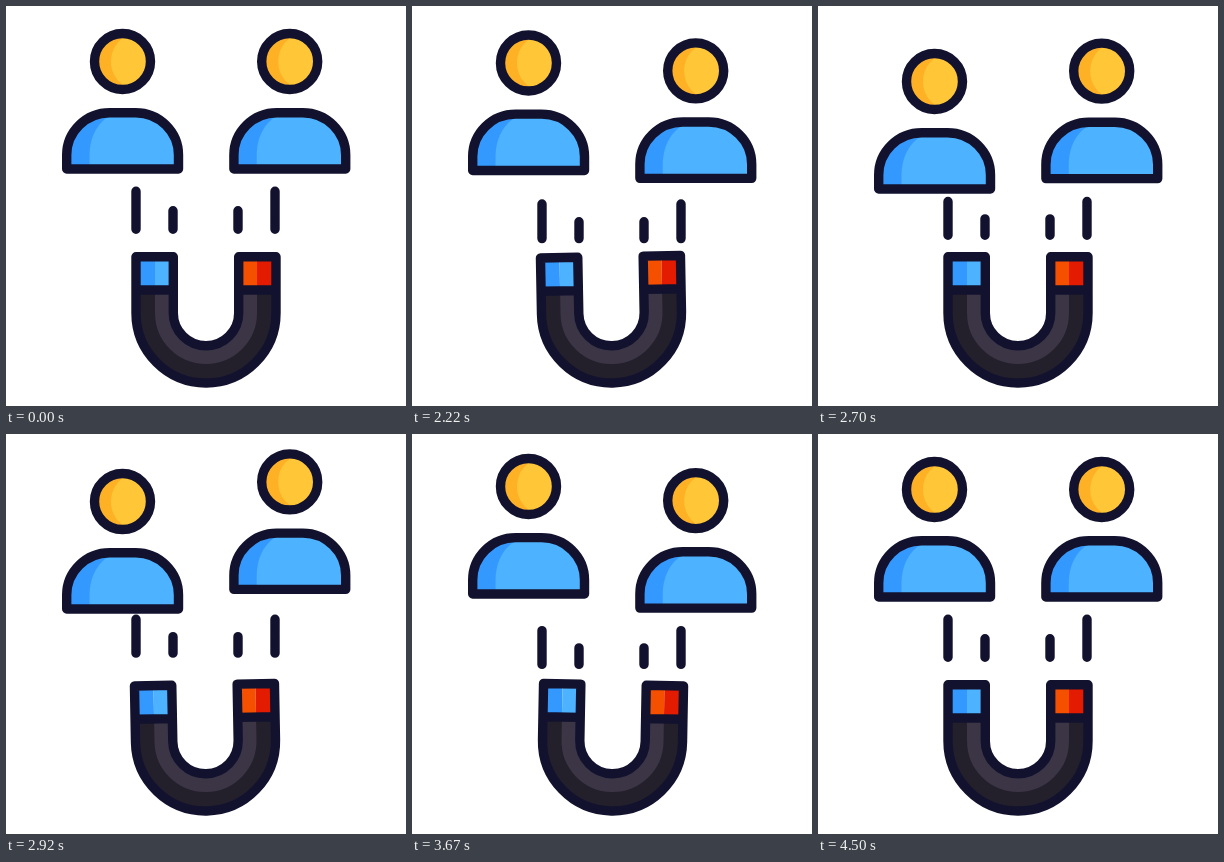
Animation, 400 px wide and 400 px high, one loop 4.52 s. Source, as an HTML page:

```html
<!DOCTYPE html>
<html lang="en">
<head>
<meta charset="utf-8">
<title>Magnet attracting people</title>
<style>
html, body { margin: 0; width: 100%; height: 100%; overflow: hidden; background: #fff; }
svg { display: block; width: 100%; height: 100%; }
.ink { fill: none; stroke: #12122f; stroke-width: 9.4; stroke-linecap: round; stroke-linejoin: round; }
</style>
</head>
<body>
<svg viewBox="0 0 400 400">
  <defs>
    <clipPath id="headClip"><circle cx="116.5" cy="55.5" r="28"/></clipPath>
    <path id="torso" d="M60.7 163V149A43 42.3 0 0 1 103.7 106.7H129.5A43 42.3 0 0 1 172.5 149V163Z"/>
    <clipPath id="torsoClip"><use href="#torso"/></clipPath>
    <g id="person">
      <g clip-path="url(#headClip)">
        <circle cx="116.5" cy="55.5" r="28" fill="#ffb125"/>
        <ellipse cx="129" cy="55.5" rx="24" ry="27" fill="#ffc738"/>
      </g>
      <circle class="ink" cx="116.5" cy="55.5" r="28"/>
      <g clip-path="url(#torsoClip)">
        <use href="#torso" fill="#3399ff"/>
        <path d="M83.5 165V150C83.5 128 94 112 112 106H180V165Z" fill="#4db2ff"/>
      </g>
      <use href="#torso" class="ink"/>
    </g>
  </defs>
  <use id="left" href="#person"/>
  <use id="right" href="#person"/>
  <path id="pull" class="ink"/>
  <g id="magnet">
    <path d="M142 284V307A58 58 0 0 0 258 307V284" fill="none" stroke="#23202b" stroke-width="24"/>
    <path d="M158 284V307A42 42 0 0 0 242 307V284" fill="none" stroke="#3b3546" stroke-width="18"/>
    <path d="M130 251H149V284H130Z" fill="#3399ff"/>
    <path d="M149 251H167V284H149Z" fill="#4db2ff"/>
    <path d="M233 251H251V284H233Z" fill="#f55000"/>
    <path d="M251 251H270V284H251Z" fill="#e31b00"/>
    <path class="ink" d="M130 250.7H167.3V307A32.7 32.7 0 0 0 232.7 307V250.7H270V307A70 70 0 0 1 130 307ZM130 284H167.3M232.7 284H270"/>
  </g>
</svg>
<script>
const LOOP = 4520, HOLD = 2020, STEP = 25;
const $ = id => document.getElementById(id);

// Keys are [step, value], joined by sine easing.
const leftKeys = [[0, 0], [5, 0], [28, 20], [56, -14], [81, 13], [100, 0]];
const rightKeys = [[0, 0], [18.5, 19.5], [44.5, -14], [70, 12], [100, 0]];
const pullKeys = [[0, 0], [1, 3.5], [18, 16.3], [38, -4.3], [58.5, 14.5], [78, -4], [89, 5], [100, 0]];
const sizeKeys = [[0, 1], [1, 1], [12, 0.89], [88, 0.89], [100, 1]];

function ease(keys, n) {
  const i = Math.max(1, keys.findIndex(k => k[0] >= n));
  const [a, from] = keys[i - 1], [b, to] = keys[i];
  return from + (to - from) * (1 - Math.cos(Math.PI * (n - a) / (b - a))) / 2;
}

function stepAt(t) {
  if (t < HOLD) return 0;
  const tick = Math.floor(t / 10) * 10;
  return Math.min(100, 1 + Math.floor((tick - HOLD) / STEP));
}

function draw(t) {
  const n = stepAt(t);
  $('left').setAttribute('transform', `translate(0 ${ease(leftKeys, n)})`);
  $('right').setAttribute('transform', `translate(167.2 ${ease(rightKeys, n)})`);

  const bottom = 223.3 + ease(pullKeys, n), size = ease(sizeKeys, n);
  const line = (x, len) => `M${x} ${bottom}V${bottom - len * size}`;
  $('pull').setAttribute('d', line(130, 38) + line(167, 18.5) + line(232, 18.5) + line(269, 38));

  const shake = [0, -1.05, 0, 1.05][n % 4];
  $('magnet').setAttribute('transform', `rotate(${shake} 200 335)`);
}

const start = performance.now();
function tick() {
  draw((performance.now() - start) % LOOP);
  requestAnimationFrame(tick);
}
tick();
</script>
</body>
</html>
```
